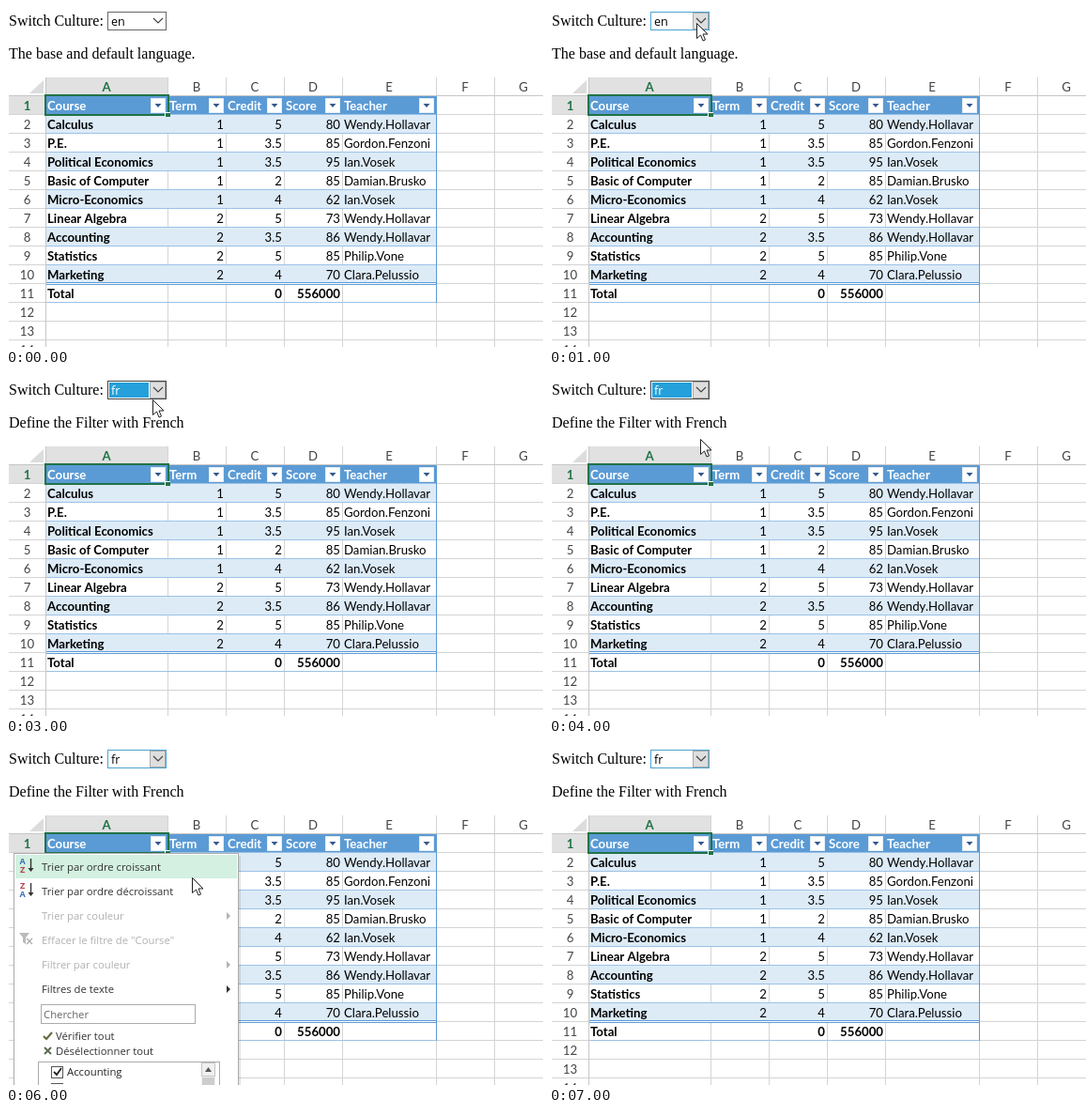
An HTML page with a canvas that plays this animation: 572x363 px, repeating every 8 s.

```html
<!DOCTYPE html>
<html lang="en">
<head>
<meta charset="utf-8">
<title>Switch culture</title>
<style>
html, body { margin: 0; width: 100%; height: 100%; overflow: hidden; background: #fff; }
canvas { display: block; }
</style>
</head>
<body>
<canvas id="stage" width="572" height="363"></canvas>
<script>
const ctx = document.getElementById('stage').getContext('2d');
const LOOP = 8000;
const SERIF = '16px "Liberation Serif", serif';
const CELL = '13.2px Lato, sans-serif';
const BOLD = 'bold ' + CELL;
const LIST = '12.6px "Open Sans", sans-serif';
const MENU = '11.3px "Open Sans", sans-serif';
const GREEN = '#217346', BLUE = '#5b9bd5', GRID = '#d4d4d4';
const EDGES = [42, 172, 234, 296, 358, 458, 520, 582];
const HEADINGS = ['Course', 'Term', 'Credit', 'Score', 'Teacher'];
const COURSES = [
  ['Calculus', 1, 5, 80, 'Wendy.Hollavar'],
  ['P.E.', 1, 3.5, 85, 'Gordon.Fenzoni'],
  ['Political Economics', 1, 3.5, 95, 'Ian.Vosek'],
  ['Basic of Computer', 1, 2, 85, 'Damian.Brusko'],
  ['Micro-Economics', 1, 4, 62, 'Ian.Vosek'],
  ['Linear Algebra', 2, 5, 73, 'Wendy.Hollavar'],
  ['Accounting', 2, 3.5, 86, 'Wendy.Hollavar'],
  ['Statistics', 2, 5, 85, 'Philip.Vone'],
  ['Marketing', 2, 4, 70, 'Clara.Pelussio']
];
const BASE = 'The base and default language.';
const FRENCH = 'Define the Filter with French';

// One scene per second.
const SCENES = [
  { value: 'en', note: BASE },
  { value: 'en', note: BASE, hover: true, arrow: [157, 18] },
  { value: 'en', note: BASE, open: true },
  { value: 'fr', note: FRENCH, focus: true, hover: true, arrow: [156, 26] },
  { value: 'fr', note: FRENCH, focus: true, arrow: [161, 68] },
  { value: 'fr', note: FRENCH, hover: true, arrow: [164, 108] },
  { value: 'fr', note: FRENCH, hover: true, menu: true, arrow: [198, 142] },
  { value: 'fr', note: FRENCH, hover: true }
];

function rect(x, y, w, h, color) {
  ctx.fillStyle = color;
  ctx.fillRect(x, y, w, h);
}
function frame(x, y, w, h, color, line = 1) {
  ctx.strokeStyle = color;
  ctx.lineWidth = line;
  ctx.strokeRect(x + line / 2, y + line / 2, w - line, h - line);
}
function text(str, x, y, font, color = '#000', align = 'left') {
  ctx.font = font;
  ctx.fillStyle = color;
  ctx.textAlign = align;
  ctx.fillText(str, x, y);
}
function shape(points, fill, stroke) {
  ctx.beginPath();
  points.forEach(([x, y]) => ctx.lineTo(x, y));
  ctx.closePath();
  ctx.fillStyle = fill;
  ctx.fill();
  if (stroke) {
    ctx.strokeStyle = stroke;
    ctx.lineWidth = 1;
    ctx.stroke();
  }
}
function path(points, color, width) {
  ctx.beginPath();
  points.forEach(([x, y]) => ctx.lineTo(x, y));
  ctx.strokeStyle = color;
  ctx.lineWidth = width;
  ctx.stroke();
}

const rowTop = row => 76 + row * 20;

function drawHeaders() {
  rect(42, 76, 130, 20, '#e1e1e1');
  rect(3, 96, 39, 20, '#e1e1e1');
  shape([[40, 79], [40, 93], [25, 93]], '#dcdcdc');
  for (let i = 0; i < 7; i++) {
    const middle = (EDGES[i] + EDGES[i + 1]) / 2;
    text('ABCDEFG'[i], middle, 91, i ? CELL : BOLD, i ? '#444' : GREEN, 'center');
  }
  for (let row = 1; row <= 14; row++) {
    text(row, 22.5, rowTop(row) + 15, row > 1 ? CELL : BOLD, row > 1 ? '#444' : GREEN, 'center');
  }
}

function drawGrid() {
  EDGES.forEach(x => rect(x, 76, 1, 287, GRID));
  for (let row = 1; row <= 14; row++) rect(3, rowTop(row) - 1, 569, 1, GRID);
  rect(3, 95, 569, 1, '#c6c6c6');
  rect(42, 76, 1, 287, '#c6c6c6');
}

function drawFilterButton(right) {
  const x = right - 18;
  rect(x, 98, 16, 16, '#fff');
  frame(x, 98, 16, 16, '#e4ecf5');
  shape([[x + 4.5, 104], [x + 11.5, 104], [x + 8, 108]], '#34588c');
}

function drawTable() {
  rect(43, 96, 416, 20, BLUE);
  HEADINGS.forEach((title, i) => {
    text(title, EDGES[i] + 2, 111, BOLD, '#fff');
    drawFilterButton(EDGES[i + 1]);
  });
  COURSES.forEach((course, i) => {
    const top = rowTop(i + 2);
    if (i % 2 === 0) rect(43, top, 416, 20, '#ddebf7');
    rect(43, top - 1, 416, 1, '#9bc2e6');
    course.forEach((value, col) => {
      const number = typeof value === 'number';
      text(value, number ? EDGES[col + 1] - 2 : EDGES[col] + 2, top + 15,
        col ? CELL : BOLD, '#000', number ? 'right' : 'left');
    });
  });
  rect(43, 294, 416, 3, BLUE);
  rect(43, 295, 416, 1, '#fff');
  rect(43, 315, 416, 1, '#9bc2e6');
  rect(458, 96, 1, 220, BLUE);
  text('Total', 44, 311, BOLD);
  text('0', 294, 311, BOLD, '#000', 'right');
  text('556000', 356, 311, BOLD, '#000', 'right');
}

function drawSelection() {
  frame(41, 94, 133, 23, GREEN, 2);
  rect(169, 113, 6, 5, '#fff');
  rect(170, 114, 5, 4, GREEN);
}

function drawSelect({ value, focus, hover }) {
  const border = focus ? '#444' : hover ? '#4aa3d1' : '#666';
  rect(108, 6, 63, 20, '#fff');
  if (focus) rect(110, 8, 42, 16, '#26a0da');
  if (hover || focus) {
    rect(153, 7, 17, 18, '#dedede');
    frame(153, 7, 17, 18, '#a9a9a9');
  }
  frame(108, 6, 63, 20, border);
  path([[157, 13], [162, 18], [167, 13]], '#444', 1.2);
  text(value, 112, 20.5, LIST, focus ? '#fff' : '#000');
}

function drawOptions() {
  rect(108, 6, 63, 89, '#fff');
  rect(110, 8, 59, 16, '#26a0da');
  rect(110, 42, 59, 16, '#dedede');
  frame(108, 6, 63, 89, '#111', 2);
  ['en', 'zh-tw', 'fr', 'de', 'Ha-Ha'].forEach((name, i) =>
    text(name, 112, 20.5 + i * 16.8, LIST, i ? '#000' : '#fff'));
}

function drawSortIcon(y, letters) {
  [...letters].forEach((letter, i) =>
    text(letter, 17.5, y + i * 9, 'bold 9px "Open Sans", sans-serif',
      letter === 'A' ? '#3b6fb5' : '#b8414c', 'center'));
  path([[26.5, y - 6], [26.5, y + 7]], '#333', 1.4);
  shape([[23.5, y + 4], [29.5, y + 4], [26.5, y + 8]], '#333');
}

function drawMenu() {
  rect(11, 119, 239, 244, 'rgba(0,0,0,.10)');
  rect(8, 116, 240, 247, '#fff');
  frame(8, 116, 240, 260, '#ababab');
  rect(10, 118, 236, 25, '#d3f0e0');
  drawSortIcon(128, 'AZ');
  drawSortIcon(154, 'ZA');
  const items = [
    ['Trier par ordre croissant'], ['Trier par ordre décroissant'],
    ['Trier par couleur', 'off', 'sub'], ['Effacer le filtre de "Course"', 'off'],
    ['Filtrer par couleur', 'off', 'sub'], ['Filtres de texte', '', 'sub']
  ];
  items.forEach(([label, off, sub], i) => {
    const y = 135 + i * 26, color = off ? '#b1b1b1' : '#333';
    text(label, 38, y, MENU, color);
    if (sub) shape([[235, y - 8], [239, y - 4], [235, y]], color);
  });
  shape([[14, 201], [25, 201], [21, 206], [21, 213], [18, 211], [18, 206]], '#bbb');
  path([[22, 207], [28, 213]], '#aaa', 1.3);
  path([[28, 207], [22, 213]], '#aaa', 1.3);

  frame(37, 277, 165, 21, '#ababab');
  text('Chercher', 40, 292, MENU, '#666');
  path([[40, 311], [43, 314], [49, 307]], '#5d6b3a', 2);
  text('Vérifier tout', 53, 315, MENU, '#333');
  path([[41, 323], [48, 330]], '#5b6b50', 2);
  path([[48, 323], [41, 330]], '#5b6b50', 2);
  text('Désélectionner tout', 53, 331, MENU, '#333');

  frame(34, 338, 194, 40, '#ababab');
  rect(208, 339, 15, 24, '#f0f0f0');
  frame(208, 339, 15, 15, '#c4c4c4');
  rect(209, 355, 13, 8, '#cdcdcd');
  shape([[212, 349], [219, 349], [215.5, 344]], '#555');
  frame(48, 343, 13, 13, '#555');
  path([[51, 349], [54, 352], [59, 345]], '#222', 1.8);
  text('Accounting', 65, 353, MENU, '#222');
  rect(48, 361, 13, 1, '#555');
}

function drawArrow([x, y]) {
  const outline = [[0, 0], [0, 16], [4, 12.5], [6.5, 18.5], [9, 17.5], [6.5, 11.5], [11.5, 11.5]];
  shape(outline.map(([dx, dy]) => [x + dx + .5, y + dy + .5]), '#fff', '#222');
}

function drawTextCursor(x, y) {
  rect(x, y - 7, 1, 15, '#222');
  for (const edge of [y - 8, y + 8]) {
    rect(x - 3, edge, 3, 1, '#222');
    rect(x + 1, edge, 3, 1, '#222');
  }
}

function draw(now) {
  const scene = SCENES[Math.floor(now % LOOP / 1000)];
  rect(0, 0, 572, 363, '#fff');
  text('Switch Culture:', 3, 21, SERIF);
  text(scene.note, 3, 56, SERIF);
  drawHeaders();
  drawGrid();
  drawTable();
  drawSelection();
  drawSelect(scene);
  if (scene.open) {
    drawOptions();
    drawTextCursor(160, 50);
  }
  if (scene.menu) drawMenu();
  if (scene.arrow) drawArrow(scene.arrow);
}

const start = performance.now();
function tick() {
  draw(performance.now() - start);
  requestAnimationFrame(tick);
}
tick();
</script>
</body>
</html>
```
